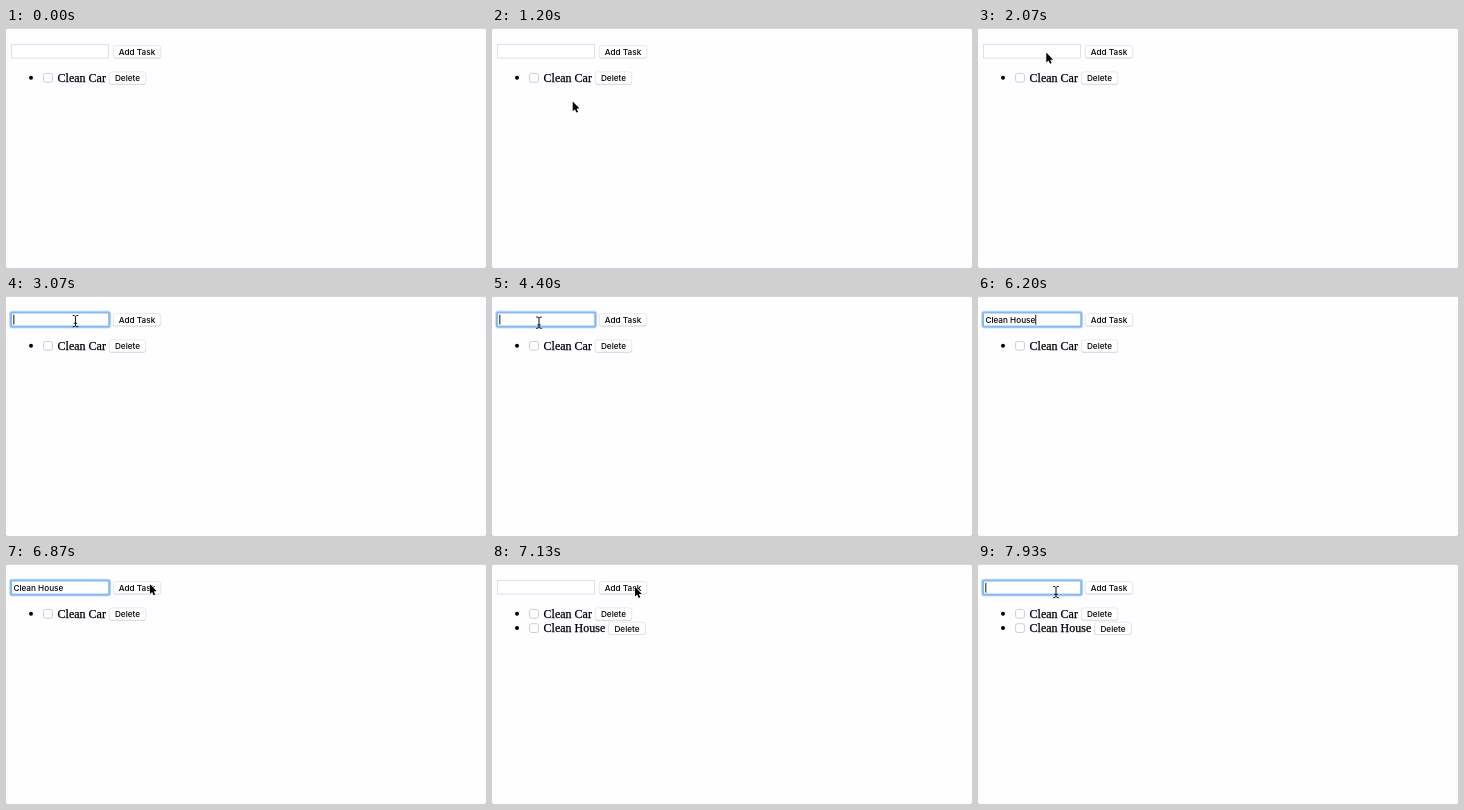
Write an HTML page that moves like this. It is 480 by 240 pixels and loops after 8 s.

```html
<!DOCTYPE html>
<html lang="en">
<head>
<meta charset="utf-8">
<title>Task list</title>
<style>
  html, body { margin: 0; width: 100%; height: 100%; overflow: hidden; background: #fefdff; }
  svg { display: block; width: 480px; height: 240px; }
  text { fill: #000; }
  .ui { font: 500 8.2px Inter, "Liberation Sans", sans-serif; }
  .item { font: 12px "Liberation Serif", serif; stroke: #000; stroke-width: .25; }
  .shadow { fill: #cdcdcd; }
  .face { fill: #fff; stroke: #e2e2e2; stroke-width: .7; }
  .pressed .face { fill: #3f8df5; stroke: #2f7be6; }
  .pressed text { fill: #fff; }
  .box { fill: #fff; stroke: #c2c2c2; stroke-width: .8; }
  .field { fill: #fff; stroke: #e0e0e0; }
  .ring { fill: none; stroke: #86b9f4; stroke-width: 2; }
  .glow { fill: none; stroke: #c3defb; }
</style>
</head>
<body>
<svg viewBox="0 0 480 240">
  <rect width="480" height="240" fill="#888"/>
  <rect width="480" height="6" fill="#d6d6d6"/>
  <rect y="1" width="480" height="239" rx="1.5" fill="#fefdff"/>

  <rect class="field" x="5.5" y="16.5" width="97" height="13.5"/>
  <g id="focus">
    <rect class="glow" x="3.6" y="15.2" width="101" height="16.8" rx="2.2"/>
    <rect class="ring" x="5" y="16.5" width="98.3" height="14.2" rx="1"/>
  </g>
  <text id="typed" class="ui" x="7.4" y="27"></text>
  <rect id="caret" y="18.8" width=".9" height="9.8"/>

  <g id="add"></g>
  <g id="list"></g>

  <path id="arrow" d="M0 0V9.8L2.2 7.8L3.7 11.1L5.3 10.4L3.9 7.1H6.8Z"
        stroke="#fff" stroke-width="1" paint-order="stroke" stroke-linejoin="round"/>
  <path id="beam" fill="none" stroke="#111"
        d="M-2.8 -5.6Q-.4 -5.6 0 -4.4Q.4 -5.6 2.8 -5.6M0 -4.6V4.8M-2.8 5.8Q-.4 5.8 0 4.6Q.4 5.8 2.8 5.8M-1.7 2.3H1.7"/>
</svg>
<script>
const LOOP = 8000, TICK = 1000 / 15, BLINK = 533;
const FOCUS = 2930, PRESS = 7000, RELEASE = 7130, REFOCUS = 7860;
const $ = id => document.getElementById(id);
const show = (id, on) => $(id).setAttribute('visibility', on ? 'visible' : 'hidden');
const within = (t, from, to) => t >= from && t < to;

const button = (label, x, y, w) => `
  <rect class="shadow" x="${x}" y="${y - 5.8}" width="${w}" height="12.4" rx="2.6"/>
  <rect class="face" x="${x + .2}" y="${y - 6.2}" width="${w - .4}" height="12.2" rx="2.5"/>
  <text class="ui" x="${x + w / 2}" y="${y + 3.2}" text-anchor="middle">${label}</text>`;

const row = (id, label, y, x) => `
  <g id="${id}">
    <circle cx="25" cy="${y}" r="2"/>
    <rect class="box" x="37.6" y="${y - 4.4}" width="8.8" height="8.8" rx="2"/>
    <text class="item" x="51.6" y="${y + 3.7}">${label}</text>
    ${button('Delete', x, y + .3, 37)}
  </g>`;

$('add').innerHTML = button('Add Task', 107, 23.8, 48);
$('list').innerHTML = row('car', 'Clean Car', 49.8, 103) + row('house', 'Clean House', 64.1, 116.5);

// Pointer moves: start ms, end ms, x, y
const entry = [217, 214];
const moves = [
  [730, 870, 135, 115], [1000, 1200, 80.7, 73.5], [1200, 1530, 77, 28],
  [1740, 2060, 68.3, 24.6], [3000, 3670, 111, 38.5], [3800, 3930, 98.5, 27],
  [4000, 4400, 47, 26.6], [4470, 4670, 85, 25], [4800, 5000, 113, 37.5],
  [6500, 6700, 148, 9], [6700, 6930, 143, 22.8], [7300, 7800, 78, 28]
];

// Typing bursts, one key per tick
const bursts = [['Clean\u00a0', 5060], ['H', 5660], ['ouse', 5930]];
const phrase = bursts.map(b => b[0]).join('');
const keys = bursts.flatMap(([s, from]) => [...s].map((_, i) => from + i * TICK));
const wakes = [FOCUS, ...keys, REFOCUS];

function pointer(t) {
  let [x, y] = entry;
  for (const [from, to, tx, ty] of moves) {
    const u = Math.min(1, Math.max(0, (t - from) / (to - from)));
    const e = u * u * (3 - 2 * u);
    x += (tx - x) * e;
    y += (ty - y) * e;
  }
  return [x, y];
}

function draw(now) {
  const t = Math.floor((now % LOOP) / TICK + .1) * TICK % LOOP;

  const [x, y] = pointer(t);
  const visible = t >= 730 && !within(t, keys[0], 6500);
  const overField = t > 2700 && x < 103 && within(y, 16, 31);
  for (const id of ['arrow', 'beam']) $(id).setAttribute('transform', `translate(${x} ${y})`);
  show('arrow', visible && !overField);
  show('beam', visible && overField);

  const count = t < RELEASE ? keys.filter(k => k <= t).length : 0;
  const typed = $('typed');
  typed.textContent = phrase.slice(0, count);
  $('caret').setAttribute('x', 7.4 + (count ? typed.getComputedTextLength() : 0));

  const focused = within(t, FOCUS, PRESS) || t >= REFOCUS;
  const awake = t - Math.max(...wakes.filter(w => w <= t));
  show('focus', focused);
  show('caret', focused && awake % (2 * BLINK) < BLINK);
  show('house', t >= RELEASE);
  $('add').setAttribute('class', within(t, PRESS, RELEASE) ? 'pressed' : '');
}

let start;
function tick(now) {
  start ??= now;
  draw(now - start);
  requestAnimationFrame(tick);
}
draw(0);
requestAnimationFrame(tick);
</script>
</body>
</html>
```
